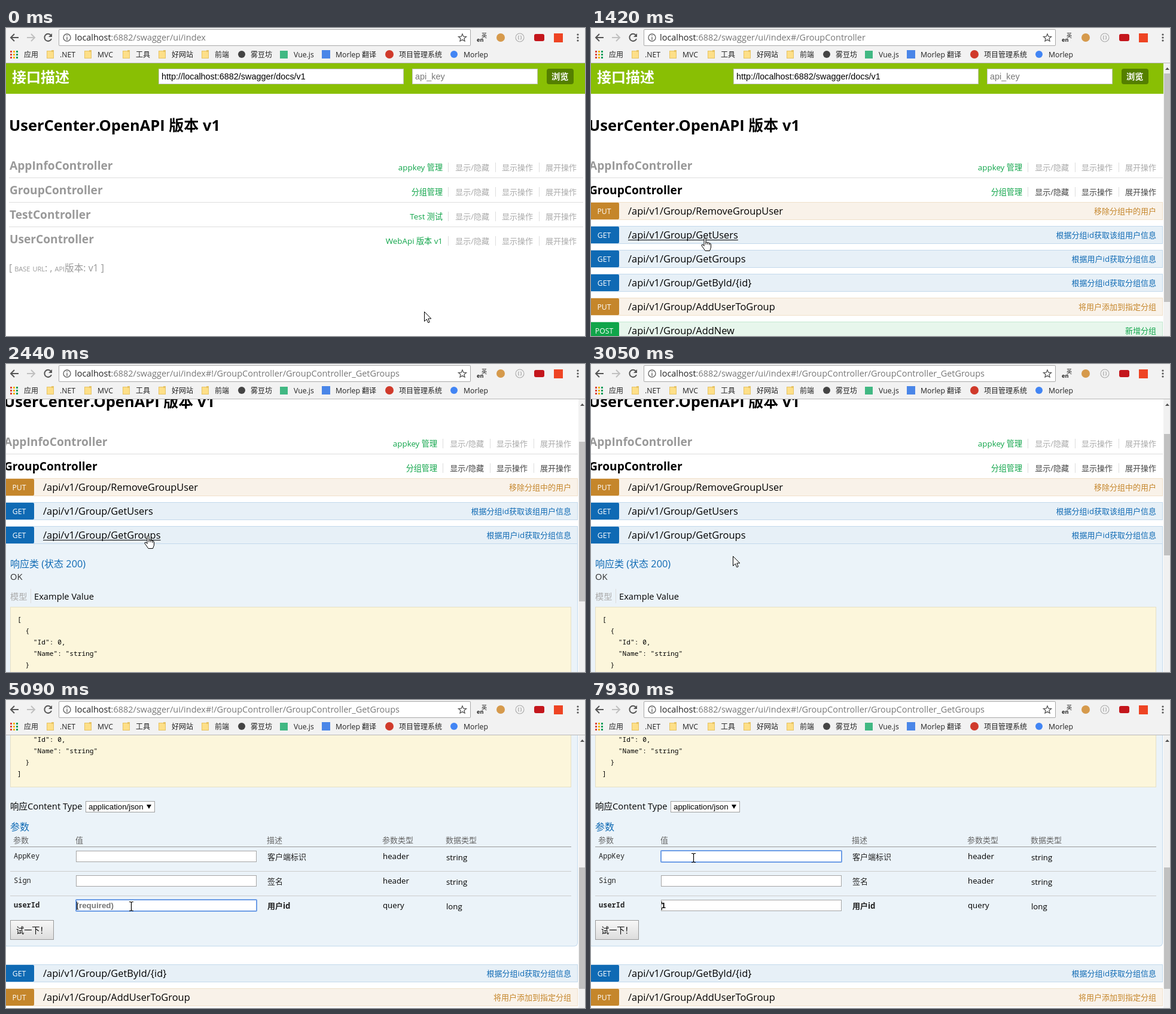
Recreate the animation shown at these times as an HTML page with a canvas. Size 968 by 515 pixels, loop 8000 ms.

```html
<!DOCTYPE html>
<html lang="zh-CN">
<head>
<meta charset="utf-8">
<style>
html, body { margin: 0; width: 100%; height: 100%; overflow: hidden; background: #fff; }
canvas { display: block; }
</style>
</head>
<body>
<canvas id="stage" width="968" height="515"></canvas>
<script>
const c = document.getElementById('stage').getContext('2d');
const LOOP = 8000, VIEW = 497, TRACK = 463;
const SANS = '"Open Sans", "Noto Sans", sans-serif';
const CJK = '"Noto Sans CJK SC", "Noto Sans SC", "Noto Sans CJK JP", sans-serif';
const ARIAL = '"Liberation Sans", Arial, sans-serif';
const MONO = '"Noto Sans Mono", monospace';
const BLUE = '#0f6ab4', GREEN = '#10a54a', ORANGE = '#c5862b';

// Pointer steps: time, shape, x, y
const pointer = [
  [0, 'arrow', 699, 474], [200, 'arrow', 590, 424], [400, 'arrow', 400, 345],
  [610, 'hand', 126, 268], [810, 'hand', 118, 268], [1020, 'hand', 118, 270],
  [1220, 'hand', 150, 305], [1420, 'hand', 184, 350], [1640, 'arrow', 215, 386],
  [1840, 'arrow', 218, 390], [2040, 'arrow', 230, 345], [2240, 'hand', 231, 286],
  [2440, 'hand', 231, 286], [2640, 'hand', 231, 288], [2840, 'arrow', 238, 308],
  [3050, 'arrow', 237, 321], [3250, 'arrow', 238, 326], [3450, 'arrow', 238, 329],
  [3850, 'arrow', 234, 304], [4050, 'beam', 214, 338], [4280, 'beam', 209, 345],
  [5900, 'beam', 204, 326], [6110, 'beam', 196, 304], [6910, 'beam', 192, 284],
  [7110, 'beam', 186, 264], [7930, 'beam', 171, 264]
];
// Page steps: time, scroll, height of the open group, height of the open panel
const page = [
  [0, 0, 0, 0], [810, 0, 110, 0], [1020, 0, 240, 0], [1640, 55, 240, 0],
  [1840, 99, 240, 0], [2440, 100, 240, 260], [2640, 100, 240, 530],
  [3250, 330, 240, 530], [3450, 499, 240, 530]
];
const at = (track, t) => track.filter(k => k[0] <= t).pop();

const groups = [['AppInfoController', 'appkey 管理'], ['GroupController', '分组管理'],
  ['TestController', 'Test 测试'], ['UserController', 'WebApi 版本 v1']];
const methods = {
  PUT: [ORANGE, '#f9f2e9', '#f0e0ca'],
  GET: [BLUE, '#e7f0f7', '#c3d9ec'],
  POST: [GREEN, '#e7f6ec', '#c3e8d1']
};
const calls = [
  ['PUT', 'RemoveGroupUser', '移除分组中的用户'],
  ['GET', 'GetUsers', '根据分组id获取该组用户信息'],
  ['GET', 'GetGroups', '根据用户id获取分组信息'],
  ['GET', 'GetById/{id}', '根据分组id获取分组信息'],
  ['PUT', 'AddUserToGroup', '将用户添加到指定分组'],
  ['POST', 'AddNew', '新增分组']
];
const params = [['AppKey', '客户端标识', 'header', 'string'],
  ['Sign', '签名', 'header', 'string'], ['userId', '用户id', 'query', 'long']];
const bookmarks = [[30, '应用'], [90, '.NET'], [153, 'MVC'], [217, '工具'], [277, '好网站'],
  [349, '前端'], [409, '雾豆坊'], [481, 'Vue.js'], [551, 'Morlep 翻译'],
  [657, '项目管理系统'], [765, 'Morlep']];

function rect(x, y, w, h, fill) {
  c.fillStyle = fill;
  c.fillRect(x, y, w, h);
}

function box(x, y, w, h, border, fill) {
  rect(x, y, w, h, border);
  rect(x + 1, y + 1, w - 2, h - 2, fill);
}

function round(x, y, w, h, r, fill) {
  c.beginPath();
  c.roundRect(x, y, w, h, r);
  c.fillStyle = fill;
  c.fill();
}

const dot = (x, y, r, fill) => round(x - r, y - r, 2 * r, 2 * r, r, fill);

function line(d, color, width = 2) {
  c.strokeStyle = color;
  c.lineWidth = width;
  c.stroke(new Path2D(d));
}

// Draws text centred on y, with Latin and Chinese runs in their own fonts; returns the end x
function text(s, x, y, size, color, { style = '', align = 'left', font = '' } = {}) {
  const runs = s.match(/[\u2e80-\uffff]+|[^\u2e80-\uffff]+/g).map(run => {
    const f = run[0] > '\u2e7f' ? `${style} ${size}px ${CJK}`
      : `${style} ${font ? size : size * 1.02}px ${font || SANS}`;
    c.font = f;
    return [run, f, c.measureText(run).width];
  });
  const width = runs.reduce((sum, r) => sum + r[2], 0);
  x -= align === 'right' ? width : align === 'center' ? width / 2 : 0;
  c.fillStyle = color;
  for (const [run, f, w] of runs) {
    c.font = f;
    c.fillText(run, x, Math.round(y + size * 0.37));
    x += w;
  }
  return x;
}

function browser(t) {
  rect(0, 0, 968, 59, '#f2f2f2');
  rect(0, 58, 968, 1, '#b8b8b8');
  line('M21 16H8M14 10L8 16L14 22', '#555');
  line('M35 16H48M42 10L48 16L42 22', '#c0c0c0');
  line('M75 12A6 6 0 1 0 76 18', '#555');
  c.fillStyle = '#555';
  c.fill(new Path2D('M77 9V15H71Z'));
  round(88, 2, 689, 28, 2, '#a9a9a9');
  round(89, 3, 687, 26, 1, '#fff');
  line('M96 16a6 6 0 1 0 12 0a6 6 0 1 0 -12 0M102 15V20M102 12V13.5', '#666', 1.4);
  let path = ':6882/swagger/ui/index';
  if (t >= 2440) path += '#!/GroupController/GroupController_GetGroups';
  else if (t >= 810) path += '#/GroupController';
  text(path, text('localhost', 115, 16, 14.2, '#222'), 16, 14.2, '#777');
  line('M763 10L764.8 14.2L769.5 14.5L766 17.5L767 22L763 19.6L759 22L760 17.5L756.5 14.5L761.2 14.2Z', '#555', 1.3);
  text('en', 787, 20, 9, '#222', { style: 'bold' });
  text('英', 795, 13, 9, '#222');
  dot(827, 16, 7, '#d69a4c');
  line('M852 16a7 7 0 1 0 14 0a7 7 0 1 0 -14 0M857.5 12.5q-2 3.5 0 7M860.5 12.5q2 3.5 0 7', '#aaa', 1.1);
  round(883, 10, 17, 12, 3, '#c4161c');
  rect(916, 9, 15, 15, '#ee4423');
  for (const y of [11, 16, 21]) dot(956, y, 1.6, '#555');

  const tints = ['#db4437', '#f4b400', '#0f9d58', '#4285f4'];
  for (let i = 0; i < 9; i++)
    rect(7 + i % 3 * 5, 38 + (i / 3 | 0) * 5, 3, 3, tints[(i + (i / 3 | 0)) % 4]);
  for (const x of [68, 131, 195, 255, 327]) {
    box(x, 38, 12, 13, '#e6c365', '#fddf88');
    rect(x + 8, 37, 4, 3, '#e6c365');
  }
  dot(394, 44, 6, '#444');
  rect(458, 38, 13, 13, '#41b883');
  rect(528, 37, 14, 14, '#4a86e8');
  dot(641, 44, 7, '#d03a2b');
  dot(749, 44, 6, '#4285f4');
  for (const [x, s] of bookmarks) text(s, x, 45, 12, '#222');
}

function header(dx) {
  rect(0, 59, 968, 51, '#89bf04');
  text('接口描述', 10, 82, 24, '#fff', { style: 'bold' });
  box(255 + dx, 68, 410, 26, '#c4c4c4', '#fff');
  text('http://localhost:6882/swagger/docs/v1', 260 + dx, 81, 14.4, '#000', { font: ARIAL });
  box(679 + dx, 68, 210, 26, '#c4c4c4', '#fff');
  text('api_key', 684 + dx, 81, 14.4, '#777', { font: ARIAL });
  round(904 + dx, 68, 45, 26, 4, '#547f00');
  text('浏览', 912 + dx, 81, 14.2, '#fff', { style: 'bold' });
}

function heading([name, note], x, y, active) {
  text(name, x + 1, y, 18.8, active ? '#000' : '#999', { style: 'bold' });
  text(note, x + 725, y + 3, 13.1, GREEN, { align: 'right' });
  ['显示/隐藏', '显示操作', '展开操作'].forEach((s, i) => {
    rect(x + [734, 813, 886][i], y - 5, 1, 16, '#ddd');
    text(s, x + [803, 876, 949][i], y + 3, 13, active ? '#444' : '#aaa', { align: 'right' });
  });
}

function call([verb, name, note], x, y, hover) {
  const [ink, fill, border] = methods[verb];
  box(x, y, 960, 30, border, fill);
  round(x + 1, y + 1, 50, 28, 2, ink);
  text(verb, x + 26, y + 16, 12, '#fff', { align: 'center' });
  const end = text('/api/v1/Group/' + name, x + 66, y + 15, 16.1, '#000');
  if (hover) rect(x + 66, y + 23, end - x - 66, 1, '#000');
  text(note, x + 949, y + 15, 13, ink, { align: 'right' });
}

function panel(t) {
  round(-4, 401, 960, 510, [0, 0, 6, 6], '#c3d9ec');
  round(-3, 401, 958, 509, [0, 0, 5, 5], '#ebf3f9');
  text('响应类 (状态 200)', 7, 434, 16, BLUE);
  text('OK', 7, 456, 14.4, '#333');
  text('模型', 7, 489, 14.2, '#aaa');
  rect(41, 476, 1, 24, '#ddd');
  text('Example Value', 47, 489, 14.4, '#000');
  box(7, 506, 938, 139, '#e5e0c6', '#fcf6db');
  ['[', '  {', '    "Id": 0,', '    "Name": "string"', '  }', ']'].forEach((s, i) =>
    text(s, 19, 527 + 19 * i, 11.2, '#000', { font: MONO }));
  text('响应Content Type', 7, 677, 14.5, '#000');
  box(133, 668, 116, 19, '#a0a0a0', '#fff');
  text('application/json', 138, 677, 13.3, '#000', { font: ARIAL });
  c.fillStyle = '#000';
  c.fill(new Path2D('M235 674H243L239 681Z'));
  text('参数', 7, 711, 16, BLUE);
  ['参数', '值', '描述', '参数类型', '数据类型'].forEach((s, i) =>
    text(s, [12, 116, 436, 629, 735][i], 733, 13, '#666'));
  rect(7, 744, 938, 1, '#999');

  const focus = t < 4680 ? -1 : t < 6320 ? 2 : t < 7310 ? 1 : 0;
  params.forEach(([name, note, kind, type], i) => {
    const y = 760 + 41 * i, style = i === 2 ? 'bold' : '';
    text(name, 13, y, 12, '#222', { style, font: MONO });
    if (i === focus) {
      round(116, y - 10, 304, 21, 2, '#6d9de6');
      rect(118, y - 8, 300, 17, '#fff');
    } else box(117, y - 9, 302, 19, '#a5a5a5', '#fff');
    text(note, 437, y + 1, 13, '#222', { style });
    text(kind, 630, y, 13, '#000');
    text(type, 736, y + 2, 13, '#000');
    if (i < 2) rect(7, y + 25, 938, 1, '#ccc');
  });
  const typed = t >= 5690;
  text(typed ? '1' : '(required)', 117.5, 842.5, 13.4, typed ? '#000' : '#777', { style: 'bold', font: ARIAL });
  if (t >= 4680) {
    rect(118, 836, 1, 4, '#000');
    rect(118, 847, 1, 3, '#000');
  }
  if (t >= 5090 && !typed) rect(118, 840, 1, 7, '#000');
  if (typed && focus === 2) rect(126, 836, 1, 14, '#000');
  if (focus === 1 && t < 6910) rect(118, 795, 1, 14, '#000');
  if (focus === 0 && t < 7730) rect(118, 754, 1, 14, '#000');

  const shade = c.createLinearGradient(0, 867, 0, 900);
  shade.addColorStop(0, '#f8f8f8');
  shade.addColorStop(1, '#dcdcdc');
  box(7, 867, 73, 33, '#999', shade);
  text('试一下！', 17, 884, 13.2, '#000');
}

function clip(y, h, paint) {
  c.save();
  c.beginPath();
  c.rect(0, y, 968, h);
  c.clip();
  paint();
  c.restore();
}

function footer(x, y) {
  ['[ ', 'base url', ': , ', 'api', '版本: v1 ]'].forEach((s, i) => {
    x = text(s, x, y, 15.6, '#999', { style: i % 2 ? 'small-caps' : '' });
  });
}

function content(t, bar, open, detail, hoverY) {
  const x = bar ? -4 : 5, grow = open + detail;
  header(bar ? -17 : 0);
  text('UserCenter.OpenAPI 版本 v1', x, 162.5, 25, '#000', { style: 'bold' });
  groups.forEach((g, i) => {
    const shift = i > 1 ? grow : 0;
    const hover = Math.abs(hoverY - 271) < 19;
    heading(g, x, 230 + 41 * i + shift, i === 1 && (open || hover));
    if (i < 3) rect(x, 250 + 41 * i + (i ? grow : 0), 960, 1, '#ddd');
  });
  if (open) clip(291, grow, () => {
    calls.forEach((k, i) => {
      const y = 291 + 40 * i + (i > 2 ? detail : 0);
      call(k, x, y, hoverY >= y && hoverY < y + 30);
    });
    if (detail) clip(401, detail - 10, () => panel(t));
  });
  footer(x, 401 + grow);
}

function scrollbar(scroll, total) {
  rect(957, 59, 11, 456, '#f1f1f1');
  c.fillStyle = '#505050';
  c.fill(new Path2D('M960 70L963.5 66L967 70Z'));
  rect(958, Math.round(76 + scroll * TRACK / total), 10, Math.round(TRACK * VIEW / total), '#c1c1c1');
}

const shapes = {
  arrow: 'M.5 .5V16.5L4.3 13L6.8 18.8L9.2 17.8L6.8 12H11.8Z',
  hand: 'M5 2Q6.5 0 8 2V8.5Q9.5 7.5 11 9Q12.5 8 14 10Q16.5 9.5 16.5 12V17L14.5 22.5H7L1 14Q.5 11.5 3 12L5 14.5Z'
};

function cursor([, shape, x, y]) {
  c.save();
  c.translate(x, y);
  if (shape === 'beam') {
    line('M-3 -7.5H-1L.5 -6.5L2 -7.5H4M.5 -6.5V6.5M-3 7.5H-1L.5 6.5L2 7.5H4', '#000', 1.2);
  } else {
    c.fillStyle = '#fff';
    c.fill(new Path2D(shapes[shape]));
    line(shapes[shape], '#000', 1);
    if (shape === 'hand') line('M8 8V12M11 9V12M14 10V13', '#000', 1);
  }
  c.restore();
}

function draw(now) {
  const t = now % LOOP, p = at(pointer, t);
  const [, scroll, open, detail] = at(page, t);
  const total = 363 + open + detail, bar = total > VIEW;
  rect(0, 0, 968, 515, '#fff');
  clip(59, 456, () => {
    c.translate(0, -scroll);
    content(t, bar, open, detail, p[1] === 'hand' ? p[3] + 1 + scroll : -99);
  });
  if (bar) scrollbar(scroll, total);
  browser(t);
  cursor(p);
}

let start;
function tick(now) {
  start ??= now;
  draw(now - start);
  requestAnimationFrame(tick);
}
draw(0);
requestAnimationFrame(tick);
</script>
</body>
</html>
```
